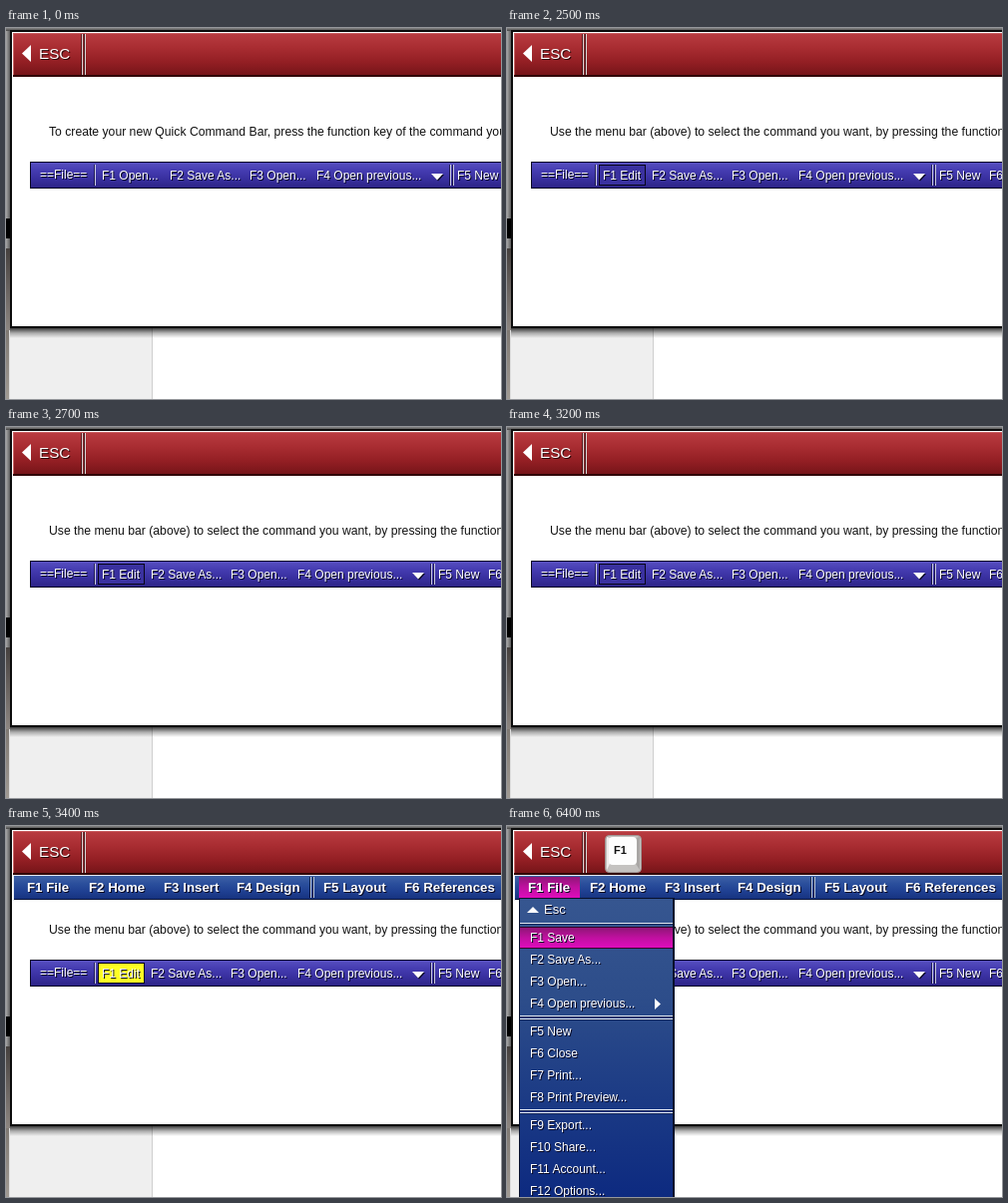
An HTML page with a canvas that plays this animation: 496x372 px, repeating every 8000 ms.

```html
<!DOCTYPE html>
<html lang="en">
<head>
<meta charset="utf-8">
<title>Quick Command Bar</title>
<style>
html, body { margin: 0; width: 100%; height: 100%; overflow: hidden; background: #fff; }
canvas { display: block; width: 496px; height: 372px; }
</style>
</head>
<body>
<canvas id="stage" width="496" height="372"></canvas>
<script>
const W = 496, H = 372, LOOP = 8000;
const ctx = document.getElementById('stage').getContext('2d');
const FONT = '"Liberation Sans", Arial, sans-serif';
const MAGENTA = ['#8f1676', '#c010a0', '#de0cbc'];
ctx.textRendering = 'optimizeLegibility'; // kerns across spaces too

function rect(x, y, w, h, fill) {
  ctx.fillStyle = fill;
  ctx.fillRect(x, y, w, h);
}

function gradient(x, y, w, h, stops, across = false) {
  const g = across ? ctx.createLinearGradient(x, 0, x + w, 0)
                   : ctx.createLinearGradient(0, y, 0, y + h);
  stops.forEach((c, i) => g.addColorStop(i / (stops.length - 1), c));
  rect(x, y, w, h, g);
}

function polygon(fill, ...pts) {
  ctx.fillStyle = fill;
  ctx.beginPath();
  pts.forEach(([x, y]) => ctx.lineTo(x, y));
  ctx.fill();
}

function text(str, x, y, size, fill, weight = 'normal') {
  ctx.font = `${weight} ${size}px ${FONT}`;
  ctx.fillStyle = fill;
  ctx.fillText(str, x, y);
}

// White label with a hard dark shadow
function label(str, x, y, size = 12, weight = 'normal') {
  text(str, x + 1, y + 1, size, '#080820', weight);
  text(str, x, y, size, '#fff', weight);
}

function divider(x, y, h, light = '#c9c9e6') {
  rect(x - 1, y, 1, h, 'rgba(0,0,0,.5)');
  rect(x, y, 1, h, light);
}

function doubleDivider(x, y, h, light) {
  divider(x, y, h, light);
  divider(x + 3, y, h, light);
}

function drawBackdrop() {
  rect(0, 0, W, H, '#fff');
  rect(4, 300, 143, 72, '#efefef');
  rect(146, 300, 1, 72, '#cfcfcf');
  gradient(0, 0, 5, 300, ['#a6a6a6', '#4c4c4c'], true);
  rect(0, 191, 5, 20, '#000');
  gradient(0, 221, 4, 82, ['#45403e', '#8d8681']);
  gradient(0, 303, 3, 69, ['#7f7973', '#a09a93']);
  rect(3, 303, 1, 69, '#dedede');
  gradient(0, 0, W, 3, ['#858585', '#454545']);
  gradient(4, 301, W - 4, 10, ['rgba(0,0,0,.75)', 'rgba(0,0,0,.28)', 'rgba(0,0,0,0)']);
}

function drawWindow() {
  rect(4, 2, W, 299, '#0c0c0c');
  rect(6, 4, W, 295, '#fff');
  gradient(7, 5, W, 43, ['#b93c41', '#a92d32', '#941f24', '#741418']);
  rect(7, 5, W, 1, '#c85a5d');
  rect(7, 5, 1, 43, '#c66');
  rect(7, 47, W, 2, '#310608');
  rect(77, 6, 2, 41, '#8f3135');
  doubleDivider(76, 6, 41, '#dcd2d3');
  polygon('#fff', [16, 25.5], [25, 17], [25, 34]);
  text('ESC', 34, 32, 15.2, '#2a0506');
  text('ESC', 33, 31, 15.2, '#fff');
}

function drawCommandBar(edited, lit) {
  const dx = edited ? -19 : 0;
  rect(24, 134, W, 27, '#0a0824');
  gradient(25, 135, W, 25, ['#574fc0', '#443bb0', '#382f9e', '#2d2487']);
  label('==File==', 34, 151);
  divider(89, 137, 21);
  if (edited) {
    rect(92, 137, 47, 21, '#08061c');
    rect(93, 138, 45, 19, lit ? '#ffff24' : '#3a31a0');
    label('F1 Edit', 96, 152);
  } else {
    label('F1 Open...', 96, 152);
  }
  label('F2 Save As...', 164 + dx, 152);
  label('F3 Open...', 244 + dx, 152);
  label('F4 Open previous...', 311 + dx, 152);
  polygon('#080820', [427 + dx, 147], [439 + dx, 147], [433 + dx, 153.5]);
  polygon('#fff', [426 + dx, 146], [438 + dx, 146], [432 + dx, 152.5]);
  doubleDivider(445 + dx, 137, 21);
  label('F5 New', 452 + dx, 152);
  label('F6', 502 + dx, 152);
}

function drawKey(x, y) {
  ctx.fillStyle = '#c4c2c0';
  ctx.strokeStyle = '#a09694';
  ctx.lineWidth = 1;
  ctx.beginPath();
  ctx.roundRect(x + .5, y + .5, 36, 37, 4);
  ctx.fill();
  ctx.stroke();
  polygon('#efeeed', [x + 2, y + 2], [x + 5, y + 3], [x + 5, y + 29], [x + 2, y + 35]);
  polygon('#a9a6a4', [x + 35, y + 2], [x + 31, y + 3], [x + 31, y + 29], [x + 35, y + 35]);
  ctx.fillStyle = '#fdfdfd';
  ctx.beginPath();
  ctx.roundRect(x + 4, y + 2, 28, 28, 4);
  ctx.fill();
  text('F1', x + 9, y + 19, 11, '#111', 'bold');
}

function drawMenuBar(right, open) {
  ctx.save();
  ctx.beginPath();
  ctx.rect(7, 47, right - 7, 28);
  ctx.clip();
  rect(7, 49, W, 26, '#e6ebf3');
  gradient(8, 50, W, 23, ['#3f62a6', '#2b4f9c', '#1f4092', '#173380']);
  rect(8, 73, W, 1, '#0a1438');
  if (open) gradient(12, 51, 61, 21, MAGENTA);
  const items = [['F1 File', 21], ['F2 Home', 83], ['F3 Insert', 158],
    ['F4 Design', 231], ['F5 Layout', 318], ['F6 References', 399]];
  for (const [name, x] of items) label(name, x, 66, 13.3, 'bold');
  doubleDivider(305, 51, 21, '#b9c6df');
  ctx.restore();
}

function menuRule(...lines) {
  for (const y of lines) {
    rect(13, y, 153, 1, '#e4eaf4');
    rect(13, y + 1, 153, 1, '#14275a');
  }
}

function drawDropdown(saveLit) {
  rect(12, 72, 156, 300, '#07102c');
  gradient(13, 73, 153, 299, ['#365690', '#2d4d8a', '#1c3b85', '#0d2a80']);
  polygon('#fff', [20, 87], [32, 87], [26, 81]);
  label('Esc', 37, 88, 13);
  menuRule(97);
  if (saveLit) {
    rect(13, 101, 153, 22, '#35042b');
    gradient(13, 102, 153, 20, MAGENTA);
  }
  const groups = [
    [116, 'Save', 'Save As...', 'Open...', 'Open previous...'],
    [210, 'New', 'Close', 'Print...', 'Print Preview...'],
    [304, 'Export...', 'Share...', 'Account...', 'Options...']
  ];
  let n = 1;
  for (const [top, ...names] of groups)
    names.forEach((name, i) => label(`F${n++} ${name}`, 23, top + 22 * i));
  polygon('#fff', [148, 173], [154, 178.5], [148, 184]);
  menuRule(190, 193);
  menuRule(284, 287);
}

function draw(t) {
  const edited = t >= 500;
  const lit = edited && t < 2500 || t >= 3300;
  const open = t >= 4400;
  drawBackdrop();
  drawWindow();
  text(edited
    ? 'Use the menu bar (above) to select the command you want, by pressing the function key'
    : 'To create your new Quick Command Bar, press the function key of the command you want',
    43, 108, 12.2, '#111');
  drawCommandBar(edited, lit);
  if (t >= 3300) drawMenuBar(t < 3400 ? 48 : W, open);
  if (open) drawDropdown(t >= 6400);
  if (edited && t < 2500) drawKey(98, 7);
  else if (open) drawKey(t < 6400 ? 95 : 98, 9);
}

const start = performance.now();
function tick() {
  draw((performance.now() - start) % LOOP);
  requestAnimationFrame(tick);
}
tick();
</script>
</body>
</html>
```
